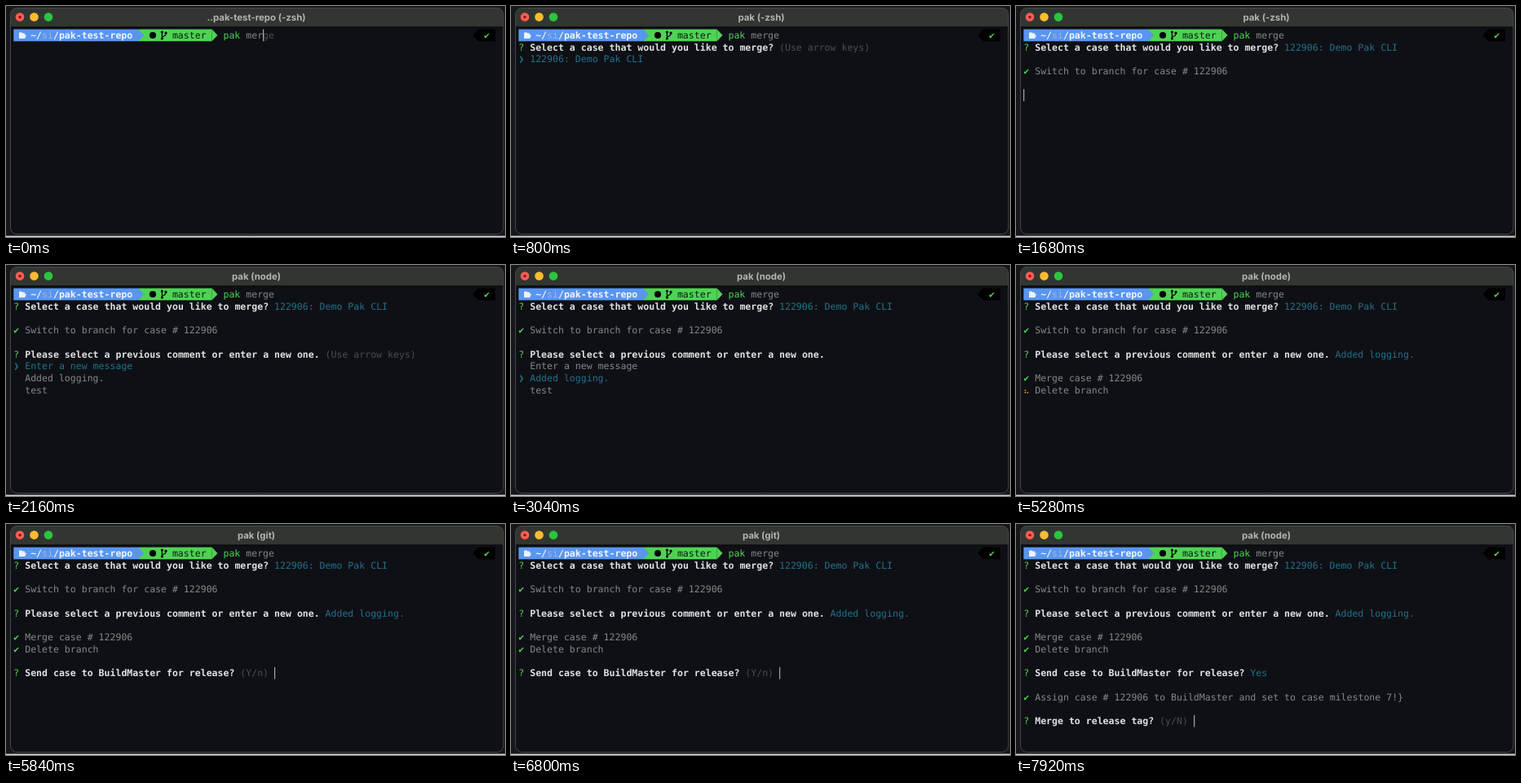
These frames come from a looping animation (612x284 px, 8000 ms). An HTML page with a canvas:

```html
<!DOCTYPE html>
<html lang="en">
<head>
<meta charset="utf-8">
<title>Terminal demo</title>
<style>
  html, body { margin: 0; width: 100%; height: 100%; overflow: hidden; background: #15171b; }
  canvas { display: block; width: 612px; height: 284px; }
</style>
</head>
<body>
<canvas id="stage" width="612" height="284"></canvas>
<script>
const ctx = document.getElementById('stage').getContext('2d');
const LOOP = 8000, STEP = 80;
const LEFT = 9.3, TOP = 28.6, CELL = 6.95, LINE = 14.73, SIZE = 11.55;
const MONO = '"DejaVu Sans Mono", "Liberation Mono", monospace';
const C = {
  fg: '#858786', bold: '#dfe2e2', dim: '#4a4d4f', cyan: '#23718a', green: '#4fd354',
  blue: '#5896f2', black: '#050607', yellow: '#c9a53c', orange: '#d08a45', cursor: '#a5a8a8'
};

const colX = col => LEFT + col * CELL;
const rowY = row => TOP + row * LINE;

function rect(x, y, w, h, color) {
  ctx.fillStyle = color;
  ctx.fillRect(x, y, w, h);
}

function polygon(color, ...points) {
  ctx.fillStyle = color;
  ctx.beginPath();
  points.forEach(([x, y]) => ctx.lineTo(x, y));
  ctx.fill();
}

function disc(x, y, r, color) {
  ctx.fillStyle = color;
  ctx.beginPath();
  ctx.arc(x, y, r, 0, 2 * Math.PI);
  ctx.fill();
}

function write(row, col, text, color = C.fg, weight = 400) {
  ctx.font = `${weight} ${SIZE}px ${MONO}`;
  ctx.textAlign = 'left';
  ctx.fillStyle = color;
  ctx.fillText(text, colX(col), rowY(row) + 11.3);
}

function question(row, text) {
  write(row, 0, '?', C.green);
  write(row, 2, text, C.bold, 700);
}

// Braille dot masks: bits 0-2 are the left column, bits 3-5 the right one.
const SPINNER = [0x0b, 0x19, 0x39, 0x38, 0x3c, 0x34, 0x26, 0x27, 0x07, 0x0f];

function spinner(row, t, offset, color) {
  const mask = SPINNER[(Math.floor(t / STEP) + offset) % SPINNER.length];
  for (let bit = 0; bit < 6; bit++) {
    if (mask >> bit & 1) {
      rect(10.6 + 3 * Math.floor(bit / 3), rowY(row) + 4.2 + 2.7 * (bit % 3), 1.6, 1.6, color);
    }
  }
}

function task(row, text, t, start, end, offset = 0, color = C.yellow) {
  if (t >= end) write(row, 0, '✔', C.green);
  else if (t >= start) spinner(row, t, offset, color);
  else rect(10.2, rowY(row) + 5, 5.4, 5.6, '#505354');
  write(row, 2, text);
}

function choices(row, items, selected) {
  items.forEach((item, i) => {
    const color = i === selected ? C.cyan : C.fg;
    if (i === selected) write(row + i, 0, '❯', color);
    write(row + i, 2, item, color);
  });
}

// The last entry whose start time has passed.
const current = (list, t) => list.filter(([start]) => start <= t).pop().slice(1);

const TITLES = [
  [0, '..pak-test-repo (-zsh)'], [240, 'pak (-zsh)'], [1840, 'pak (node)'],
  [5760, 'pak (git)'], [7200, 'pak (node)']
];

const CURSORS = [
  [0, 0, 44], [80, 0, 45], [160, 0, 46], [240, 1, 0], [480], [1600, 5, 0], [1760],
  [5840, 10, 46], [7760], [7920, 14, 30]
];

function drawWindow(t) {
  rect(0, 0, 612, 284, '#15171b');
  rect(0, 282.6, 612, 1.4, '#d5d7d9');
  ctx.save();
  ctx.beginPath();
  ctx.roundRect(5.5, 2, 604.5, 278.5, 8);
  ctx.fillStyle = '#0f1015';
  ctx.fill();
  ctx.clip();
  rect(5, 2, 606, 23.5, '#323631');
  rect(5, 25.5, 606, 1, '#08090b');
  ctx.restore();
  ctx.beginPath();
  ctx.roundRect(5.5, 2.5, 604.5, 278, 8);
  ctx.strokeStyle = '#44484a';
  ctx.lineWidth = 1;
  ctx.stroke();

  disc(17, 13.6, 5.3, '#fd5c55');
  disc(17, 13.6, 1.7, '#80120d');
  disc(34.5, 13.6, 5.3, '#fdbc30');
  disc(52, 13.6, 5.3, '#2ac53f');

  ctx.font = '700 11.4px Inter, "Open Sans", sans-serif';
  ctx.textAlign = 'center';
  ctx.fillStyle = '#b2b5b1';
  ctx.fillText(current(TITLES, t)[0], 307, 17.6);
}

function drawBranchIcon() {
  ctx.strokeStyle = C.black;
  ctx.lineWidth = 1.3;
  ctx.beginPath();
  ctx.moveTo(191.4, 32);
  ctx.lineTo(191.4, 40);
  ctx.moveTo(196, 34);
  ctx.quadraticCurveTo(196, 36.8, 191.4, 38);
  ctx.stroke();
  [[191.4, 32], [191.4, 40], [196, 33.2]].forEach(([x, y]) => disc(x, y, 1.6, C.black));
}

function drawPrompt(t) {
  const top = rowY(0), mid = top + LINE / 2, bottom = top + LINE;
  rect(colX(22), top, 13 * CELL, LINE, C.green);
  rect(LEFT, top, 22 * CELL, LINE, C.blue);
  polygon(C.blue, [colX(22), top], [colX(23), mid], [colX(22), bottom]);
  polygon(C.green, [colX(35), top], [colX(36), mid], [colX(35), bottom]);

  polygon('#eef3fa', [16, 32.4], [19.4, 32.4], [20.4, 33.6], [23, 33.6], [23, 35.4],
    [25, 35.4], [23.2, 40], [16, 40]);
  write(0, 3, '~/', '#f0f5fb', 700);
  write(0, 5, 'si', '#a3b5d2');
  write(0, 7, '/pak-test-repo', '#f0f5fb', 700);

  disc(180, 36, 4.1, C.black);
  drawBranchIcon();
  write(0, 28, 'master', '#0b1c0e');

  write(0, 37, 'pak', C.green);
  const typed = t < 80 ? 3 : t < 160 ? 4 : 5;
  write(0, 41, 'merge'.slice(0, typed));
  write(0, 41 + typed, 'merge'.slice(typed), C.dim);

  rect(colX(82), top, 3 * CELL, LINE, '#000');
  polygon('#000', [colX(82), top], [colX(81), mid], [colX(82), bottom]);
  write(0, 83, '✔', C.green);
}

function drawSession(t) {
  if (t >= 480) {
    question(1, 'Select a case that would you like to merge?');
    if (t < 960) {
      write(1, 46, '(Use arrow keys)', C.dim);
      choices(2, ['122906: Demo Pak CLI'], 0);
    } else {
      write(1, 46, '122906: Demo Pak CLI', C.cyan);
    }
  }
  if (t >= 1040) task(3, 'Switch to branch for case # 122906', t, 1040, 1600);

  if (t >= 1760) {
    question(5, 'Please select a previous comment or enter a new one.');
    if (t < 3360) {
      const moved = t >= 2800;
      if (!moved) write(5, 55, '(Use arrow keys)', C.dim);
      choices(6, ['Enter a new message', 'Added logging.', 'test'], moved ? 1 : 0);
    } else {
      write(5, 55, 'Added logging.', C.cyan);
    }
  }
  if (t >= 3440) {
    task(7, 'Merge case # 122906', t, 3440, 4880, 3, C.orange);
    task(8, 'Delete branch', t, 4880, 5760);
  }

  if (t >= 5840) {
    question(10, 'Send case to BuildMaster for release?');
    if (t < 7760) write(10, 40, '(Y/n)', C.dim);
    else write(10, 40, 'Yes', C.cyan);
  }
  if (t >= 7840) {
    task(12, 'Assign case # 122906 to BuildMaster and set to case milestone 7!}', t, 7840, 7920);
  }
  if (t >= 7920) {
    question(14, 'Merge to release tag?');
    write(14, 24, '(y/N)', C.dim);
  }
}

function drawCursor(t) {
  const [row, col] = current(CURSORS, t);
  if (row !== undefined) rect(Math.round(colX(col)), rowY(row), 1.2, LINE, C.cursor);
}

function frame() {
  const t = performance.now() % LOOP;
  ctx.textRendering = 'geometricPrecision';
  drawWindow(t);
  drawPrompt(t);
  drawSession(t);
  drawCursor(t);
  requestAnimationFrame(frame);
}
frame();
</script>
</body>
</html>
```
